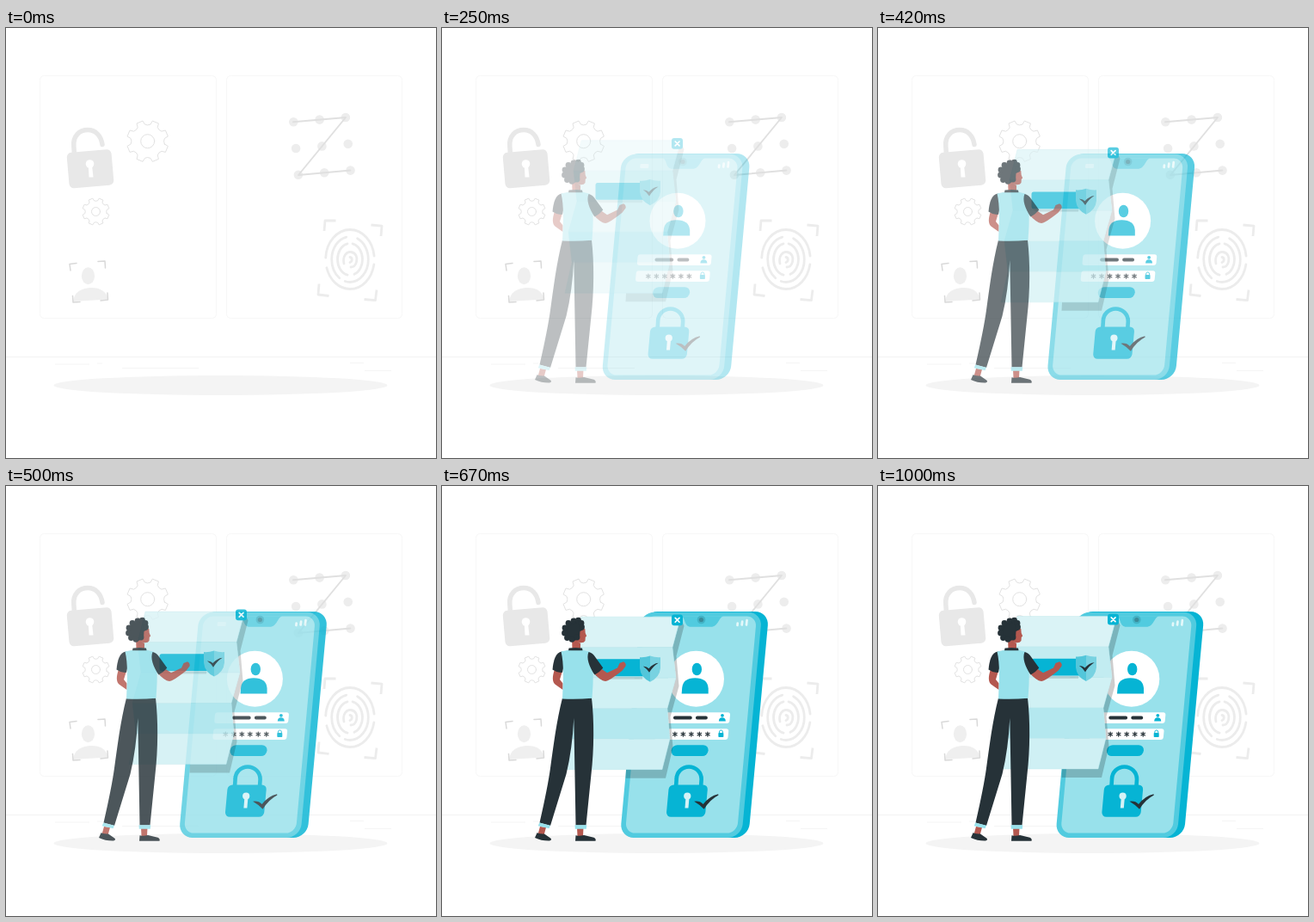
Animation of 500x500 px, one loop 1.04 s. Source, as an HTML page:

```html
<!DOCTYPE html>
<html lang="en">
<head>
<meta charset="utf-8">
<title>Secure login</title>
<style>
  html, body { margin: 0; width: 100%; height: 100%; overflow: hidden; background: #fff; }
  svg { display: block; width: 100vw; height: 100vh; }
  .line { fill: none; stroke-linecap: round; stroke-linejoin: round; }
  .base { fill: #06b4d4; }
  .bezel { fill: #51cbdf; }
  .screen { fill: #98e1eb; }
  .white { fill: #fff; }
  .dark { fill: #263238; }
  .skin { fill: #b4584f; }
  .vest { fill: #98e1eb; }
</style>
</head>
<body>
<svg viewBox="0 0 500 500" xmlns="http://www.w3.org/2000/svg">
  <g id="backdrop">
    <g fill="none" stroke="#f7f7f7">
      <rect x="39.5" y="55.5" width="205" height="282" rx="5"/>
      <rect x="256.5" y="55.5" width="204" height="282" rx="5"/>
    </g>
    <path d="M0 382.5H500" stroke="#f3f3f3"/>
    <path d="M57 391H97M106 390H112M135 395.5H224M400 389.5H416M417 398.5H448" stroke="#f5f5f5"/>
    <ellipse cx="249.5" cy="415.5" rx="194" ry="11.5" fill="#f4f4f4"/>

    <g id="greyLock">
      <path class="line" d="M79.5 148L78.8 137C78 126 85 118.6 95 118.6C104 118.6 110.500 125 112 135.500" stroke="#e8e8e8" stroke-width="5.5"/>
      <rect x="72" y="143" width="52" height="41.500" rx="5.500" fill="#e8e8e8" transform="rotate(-5 98 163.500)"/>
      <circle cx="97.500" cy="158" r="4.800" fill="#fff"/>
      <path d="M95.800 160L96.500 173.500H101.500L100 160Z" fill="#fff"/>
    </g>

    <g id="gears" class="line" stroke="#e2e2e2"></g>

    <g id="faceScan">
      <ellipse cx="95.500" cy="288.200" rx="7.600" ry="10" fill="#efefef"/>
      <path d="M78 318C79 307 88 302.500 98 302C109 301.500 117 306 118.500 315.500Z" fill="#efefef"/>
      <path class="line" d="M75 282L74 274.500L82 273.500M107 271.500L115 271L115.500 279M77.500 311.500L78 319L86 318.500M110 317L118.500 316L118 308" stroke="#d9d9d9" stroke-width="1.500"/>
    </g>

    <g id="pattern">
      <g id="dots" fill="#ededed"></g>
      <path class="line" d="M334 109.300L395 104L340 171L400.500 165.500" stroke="#e0e0e0" stroke-width="1.900"/>
    </g>

    <g id="fingerprint" class="line" stroke="#ececec" stroke-width="2.800">
      <path d="M370 236L371 224L383.500 224M424.500 229L437 230.200L436 242M364 297.500L363 310L375.500 311.500M416.500 315.500L429.500 316.700L431 304.500" stroke-linecap="butt"/>
      <ellipse cx="400" cy="269" rx="28.300" ry="34.500" pathLength="100" stroke-dasharray="42 6 47 5" stroke-dashoffset="-3"/>
      <ellipse cx="400" cy="269" rx="21.300" ry="26.500" pathLength="100" stroke-dasharray="29 5 38 9 19 0" />
      <ellipse cx="400" cy="269" rx="14.500" ry="18.500" pathLength="100" stroke-dasharray="20 8 44 6 22 0"/>
      <path d="M393 274C391 265 396 260 401 260.500C407 261 409 267 407.500 272C406.500 276 404 278 401 278M400 266.500C403 267 403 271 400 272.500"/>
    </g>
  </g>

  <g id="phone">
    <g transform="matrix(1 0 -.0915 1 37.4 0)">
      <rect class="base" x="210" y="146" width="145.600" height="263" rx="16"/>
      <rect class="bezel" x="206.200" y="146.700" width="141.400" height="262.300" rx="16"/>
      <rect class="screen" x="211.800" y="151.600" width="130" height="252" rx="11.500"/>
      <rect class="white" x="228.500" y="158" width="10" height="5" rx="1" opacity=".6"/>
      <rect class="white" x="235.300" y="263.200" width="86" height="12.800" rx="3"/>
      <rect class="white" x="235.200" y="282.200" width="86" height="12.800" rx="3"/>
      <rect class="base" x="256.700" y="301.200" width="43" height="12.800" rx="6.400"/>
      <rect class="base" x="257.700" y="347.500" width="45.300" height="37.300" rx="5.500"/>
    </g>
    <path class="bezel" d="M277 151.200H327C321 152 321 163.800 312 163.800H289C280 163.800 283 152 277 151.200Z"/>
    <circle cx="300.800" cy="155.500" r="4.800" fill="#42b3c6"/>
    <circle cx="300.800" cy="155.500" r="2.600" fill="#3a8c9b"/>
    <path class="line" d="M342.800 162L343.100 159.500M348 161.500L348.500 157.700M353.300 161.500L353.900 156.200" stroke="#e4f8fa" stroke-width="2.700"/>

    <circle class="white" cx="294.800" cy="224.300" r="32.500"/>
    <ellipse class="base" cx="295.700" cy="213" rx="5.700" ry="7.300"/>
    <path class="base" d="M278 241.500L278.500 235Q279.500 223.200 293.500 223.200Q308 223.200 309 235V241.500Z"/>

    <path class="line" d="M270.200 269.500H288.200M296.200 269.500H306.300" stroke="#263238" stroke-width="3.800"/>
    <circle class="base" cx="325.300" cy="266.800" r="1.900"/>
    <path class="base" d="M321.200 273.500Q321.500 269.300 325 269.300Q329 269.300 329.200 273.500Z"/>
    <path id="stars" class="line" stroke="#263238" stroke-width="1.200"/>
    <rect class="base" x="320.700" y="287" width="6" height="5" rx=".8"/>
    <path class="line" d="M321.800 287V286A2 2 0 0 1 325.800 286V287" stroke="#06b4d4" stroke-width=".9"/>

    <path class="line" d="M271.400 350L272 341A14.500 14.500 0 0 1 301 341L300.400 350" stroke="#06b4d4" stroke-width="4.600"/>
    <circle cx="284.600" cy="360.500" r="4.100" fill="#d4f2f6"/>
    <path d="M282.800 362L281.800 374.500H285.800L286.900 362Z" fill="#d4f2f6"/>
    <path class="dark" d="M292.500 366.800Q299 365.800 303 370Q310.500 360.500 320.500 358.300L320.800 359.500Q311 364.500 304 375.800Q299 370.500 292.500 366.800Z"/>
  </g>

  <g id="paper">
    <path d="M214 329H256L265 293L262 258L272 222L268 187L277.500 153L281.500 162L272.500 197L275.500 232L265.500 268L268.500 303L260 339H213.500Z" fill="#000" opacity=".2"/>
    <g id="strips" stroke="#b5e3e9" stroke-width=".4"></g>
    <path d="M180 221H233V224H184Z" fill="#000" opacity=".12"/>
    <rect class="base" x="178.500" y="200.700" width="58" height="19.800" rx="2.500"/>
    <path d="M242 196.800Q236 199 230 198.500V211Q231 222 242 227Z" fill="#53c6da"/>
    <path d="M242 196.800Q248 199 254 198.500V211Q253 222 242 227Z" fill="#78d2e1"/>
    <path class="dark" d="M234 209Q238 208.700 240.500 211.500Q245.500 205.800 251.700 205.200Q245.500 208.800 241 216.200Q238 211.500 234 209Z"/>
    <rect class="base" x="267" y="148.800" width="13" height="12.800" rx="3"/>
    <path class="line" d="M271.200 152.800L276 157.600M276 152.800L271.200 157.600" stroke="#fff" stroke-width="1.700"/>
  </g>

  <g id="man">
    <path class="skin" d="M114 396L111.500 405L118.500 406L121 397ZM157 397L157.500 407H164L164.500 397Z"/>
    <path class="dark" d="M110.500 403.200Q115 405 119 404.500L126.500 409.800Q128 412 125 412.500Q116 412.800 108 409ZM155.500 406.200Q160 407.500 165 406L176.500 408.700Q179.500 410 178.500 412.800H155Z"/>
    <path class="dark" d="M140 246.500H174C177 272 177 306 173.500 335L167.500 394.500H155.500L153.300 270Q151.500 306 144.500 335L126 395L113.500 391.500Q123 350 126 328C130 300 133 274 140 246.500Z"/>
    <path class="vest" d="M113.200 391.500L126 394.800L124.500 398.300L111.800 395.200ZM154.500 394.300H168.300L167.800 398.700H154.800Z"/>
    <path class="skin" d="M131 213C128 222 128 228 132 231L140.500 237V229.500L137 225L140 215Z"/>
    <path class="dark" d="M140 192.500C132 193 129.500 203 128.500 213.500Q134 217.500 140 216.800L143 203Z"/>
    <path class="skin" d="M176 217Q184 226.500 190 227Q194 227 209.500 214.800L213.500 209.500Q214.500 206 211 204.300L206.500 206L204 211.500L192 217.300L183 211Z"/>
    <path class="skin" d="M151 176L151.500 190H161L161 183Z"/>
    <path class="vest" d="M138.500 192.500L148 190.500H163L171.500 192.800C175.500 202 177 219 174.500 246.700Q157 248.500 140 247.500C141 226 142 207 138.500 192.500Z"/>
    <path class="dark" d="M147.500 188.500Q155 187.300 163 188.500L163.500 191.300H147ZM170.500 193Q175 193.500 179 200L187.300 211.500Q183 217 177.500 219.500C171 210 167.500 200 170.500 193Z"/>
    <path class="skin" d="M158 165L166.300 166L166.700 171L168.200 174.500L166.800 175.800L166.500 180Q165 182.800 159.500 182L151 178Z"/>
    <g id="hair" class="dark">
      <path d="M144 163L156 155L165 160L164.500 167L160.500 169L160 177L153 180.500L144 176Z"/>
    </g>
  </g>
</svg>

<script>
const byId = id => document.getElementById(id);
const phone = byId('phone'), paper = byId('paper'), man = byId('man');

function gearPath(cx, cy, radius, hole) {
  const point = (deg, r) => {
    const a = deg * Math.PI / 180;
    return `${(cx + r * Math.cos(a)).toFixed(2)} ${(cy + r * Math.sin(a)).toFixed(2)}`;
  };
  let d = '';
  for (let i = 0; i < 8; i++) {
    const a = i * 45 + 22.5;
    d += `${i ? 'L' : 'M'}${point(a - 13, radius * .82)}L${point(a - 9, radius)}` +
         `L${point(a + 9, radius)}L${point(a + 13, radius * .82)}` +
         `Q${point(a + 22.5, radius * .74)} ${point(a + 32, radius * .82)}`;
  }
  return `<path d="${d}Z"/><circle cx="${cx}" cy="${cy}" r="${hole}"/>`;
}

const circle = (x, y, r) => `<circle cx="${x}" cy="${y}" r="${r}"/>`;

byId('gears').innerHTML = gearPath(164.7, 131.7, 24.3, 8) + gearPath(104.5, 213.5, 15.8, 5);

let dots = '';
for (let row = 0; row < 3; row++)
  for (let col = 0; col < 3; col++)
    dots += circle(334.3 + 30.3 * col + 2.8 * row, 109.2 - 2.6 * col + 30.8 * row, 5.3);
byId('dots').innerHTML = dots;

let stars = '';
for (let i = 0; i < 6; i++)
  stars += `M${260.7 + 9.5 * i} 286v5.2m-2.3 -3.9l4.6 2.6m0 -2.6l-4.6 2.6`;
byId('stars').setAttribute('d', stars);

// Curly outline of the hair
byId('hair').innerHTML += [
  [143, 165], [147, 159.5], [153, 156.8], [158.5, 156.2], [162, 159.5], [162.5, 164],
  [142.5, 171], [145.5, 176.5], [151, 178.3], [157, 176]
].map(([x, y]) => circle(x, y, 3.4)).join('');

const rightEdge = [277.5, 268, 272, 262, 265, 256];
const leftEdge = [162, 153, 157, 147, 151, 143];
const stripColors = ['#daf3f6', '#c2ecf1', '#d0f1f4', '#b4e8ef', '#cff0f4'];
byId('strips').innerHTML = stripColors.map((color, i) => {
  const top = 151.5 + 35.5 * i, bottom = top + 35.5;
  return `<path fill="${color}" d="M${leftEdge[i]} ${top}H${rightEdge[i]}L${rightEdge[i + 1]} ${bottom}H${leftEdge[i + 1]}Z"/>`;
}).join('');

// cubic-bezier(.36, -.01, .5, 1.38): overshoots, then settles
function ease(x) {
  const bezier = (s, a, b) => 3 * a * s * (1 - s) ** 2 + 3 * b * s * s * (1 - s) + s ** 3;
  let low = 0, high = 1;
  for (let i = 0; i < 30; i++) {
    const mid = (low + high) / 2;
    if (bezier(mid, .36, .5) < x) low = mid; else high = mid;
  }
  return bezier(low, -.01, 1.38);
}

const LOOP = 1040, FPS = 24, TRAVEL = 30;

// Steps at 24 per second, with starts rounded to 10 ms
function stepAt(ms) {
  let step = FPS;
  while (step > 0 && 10 * Math.round(step * 100 / FPS) > ms) step--;
  return step;
}

function render(ms) {
  const step = stepAt(ms % LOOP);
  const progress = step < 2 ? 0 : step >= FPS - 1 ? 1 : ease((step + 1) / FPS);
  const opacity = Math.min(1, Math.max(0, progress));
  const shift = TRAVEL * (progress - 1);
  for (const part of [phone, paper, man]) part.setAttribute('opacity', opacity);
  phone.setAttribute('transform', `translate(${shift} 0)`);
  paper.setAttribute('transform', `translate(0 ${shift})`);
}

const start = performance.now();
function tick() {
  render(performance.now() - start);
  requestAnimationFrame(tick);
}
tick();
</script>
</body>
</html>
```
